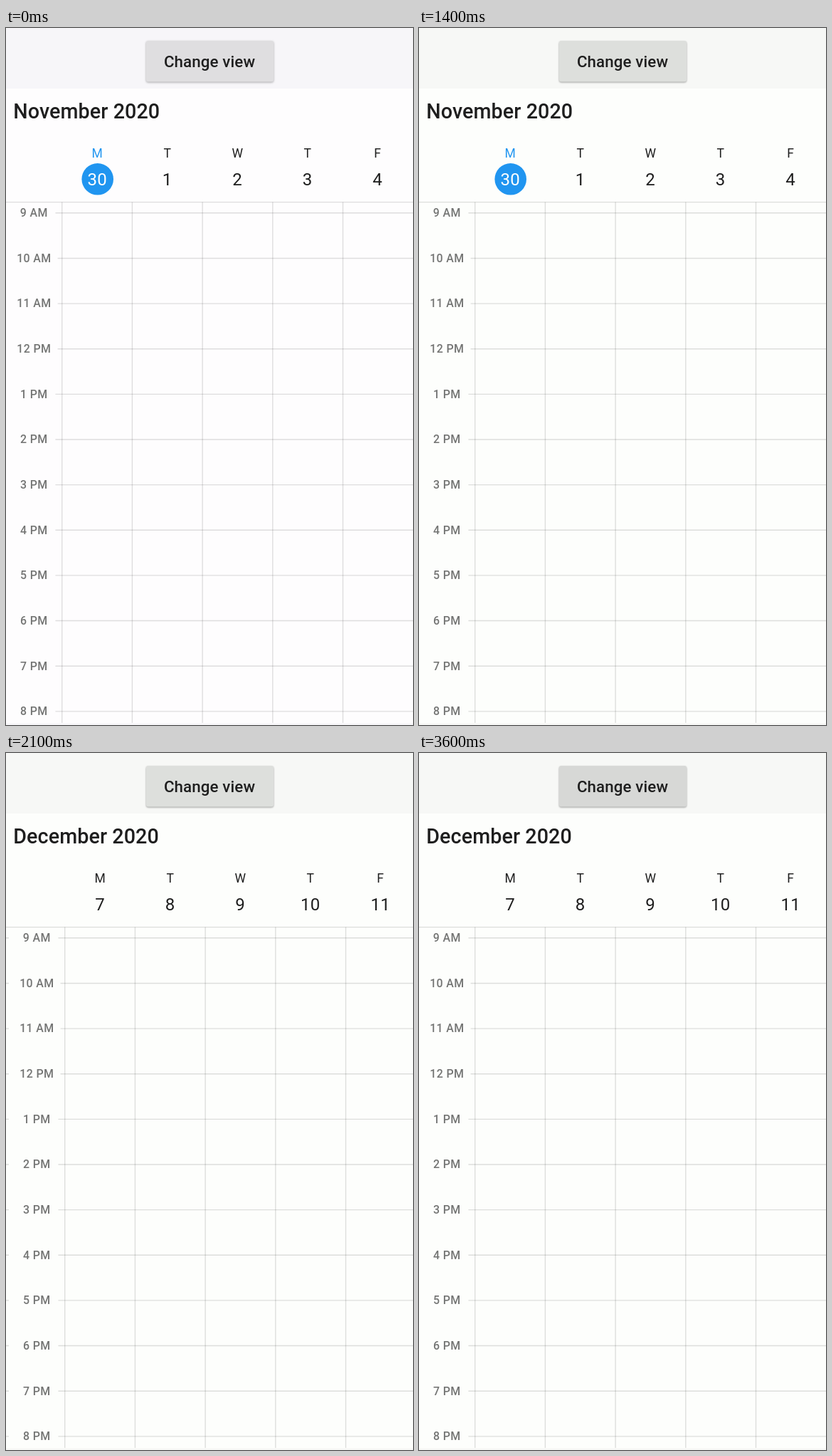
An HTML page that plays this animation: 572 by 979 pixels, repeating every 4.2 s.

```html
<!DOCTYPE html>
<html lang="en">
<head>
<meta charset="utf-8">
<title>Work week calendar</title>
<style>
  html, body { margin: 0; width: 100%; height: 100%; overflow: hidden; background: #f7f8f6; }
  svg { display: block; width: 572px; height: 979px; }
  text { font-family: Roboto, "Noto Sans", sans-serif; fill: #1e1e1e; }

  .bar, .sheet, .button, .pages, .nov, .dec {
    animation: 4200ms step-end infinite;
  }
  .bar { animation-name: bar; }
  .sheet { animation-name: sheet; }
  .button { animation-name: button; }
  .pages { animation-name: swipe; }
  .nov { animation-name: nov; }
  .dec { animation-name: dec; }

  .caption { font-size: 22.3px; font-weight: 500; letter-spacing: .12px; text-anchor: middle; }
  .month { font-size: 28.7px; font-weight: 500; letter-spacing: .08px; }
  .day { font-size: 17.5px; text-anchor: middle; }
  .date { font-size: 24px; letter-spacing: .2px; text-anchor: middle; }
  .hour { font-size: 15.9px; font-weight: 500; letter-spacing: .35px; text-anchor: middle; fill: #747574; }
  .blue { fill: #2095f0; }
  .white { fill: #fff; }
  .line { stroke: #000; stroke-opacity: .125; stroke-width: 1.4; }

  @keyframes bar { 0% { fill: #f7f6f9; } 2.38%, 100% { fill: #f7f8f6; } }
  @keyframes sheet { 0% { fill: #fefdfe; } 2.38%, 100% { fill: #fdfefc; } }
  @keyframes button {
    0% { fill: #dfdee0; filter: drop-shadow(0 1px 1.6px rgba(0, 0, 0, .32)); }
    2.38% { fill: #dddfdc; filter: drop-shadow(0 1px 1.2px rgba(0, 0, 0, .36)); }
    85.714%, 100% { fill: #d7d8d6; filter: drop-shadow(0 1px 1.2px rgba(0, 0, 0, .36)); }
  }
  @keyframes swipe {
    0% { transform: translateX(0); }
    45.238% { transform: translateX(-184px); }
    47.619% { transform: translateX(-510px); }
    50% { transform: translateX(-568px); }
    52.38%, 100% { transform: translateX(-572px); }
  }
  @keyframes nov { 0% { opacity: 1; } 45.238%, 100% { opacity: 0; } }
  @keyframes dec { 0% { opacity: 0; } 45.238%, 100% { opacity: 1; } }
</style>
</head>
<body>
<svg viewBox="0 0 572 979">
  <rect class="bar" width="572" height="979"/>
  <rect class="sheet" y="85" width="572" height="891.5"/>
  <rect class="button" x="197" y="18" width="179" height="57.5" rx="3"/>
  <text class="caption" x="286" y="55">Change view</text>
  <text class="month nov" x="10.3" y="127.4">November 2020</text>
  <text class="month dec" x="10.3" y="127.4">December 2020</text>
  <line class="line" x1="0" x2="572" y1="244.6" y2="244.6"/>
  <g class="pages" id="pages"></g>
</svg>
<script>
  const WIDTH = 572, DAYS = 'MTWTF';
  const pages = document.getElementById('pages');

  function add(parent, tag, attrs, text = '') {
    const el = document.createElementNS('http://www.w3.org/2000/svg', tag);
    for (const key in attrs) el.setAttribute(key, attrs[key]);
    el.textContent = text;
    parent.append(el);
    return el;
  }

  function line(parent, x1, y1, x2, y2) {
    add(parent, 'line', { class: 'line', x1, y1, x2, y2 });
  }

  function addPage(index, dates, today) {
    const page = add(pages, 'g', { transform: `translate(${index * WIDTH} 0)` });

    dates.forEach((date, i) => {
      const x = 128.2 + i * 98.5;
      const now = date === today;
      if (now) add(page, 'circle', { class: 'blue', cx: 128.7, cy: 212.3, r: 22.3 });
      add(page, 'text', { class: now ? 'day blue' : 'day', x, y: 182 }, DAYS[i]);
      add(page, 'text', { class: now ? 'date white' : 'date', x, y: 220.5 }, date);
      const edge = 78.7 + i * 98.7;
      line(page, edge, 244.6, edge, 976);
    });

    for (let i = 0; i < 12; i++) {
      const hour = (i + 8) % 12 + 1;
      const y = 259.8 + i * 63.64;
      const label = `${hour} ${i < 3 ? 'AM' : 'PM'}`;
      add(page, 'text', { class: 'hour', x: 39.3, y: y + 5.3 }, label);
      line(page, hour > 9 ? 72.6 : 69.4, y, WIDTH, y);
    }
  }

  addPage(0, [30, 1, 2, 3, 4], 30);
  addPage(1, [7, 8, 9, 10, 11]);
</script>
</body>
</html>
```
